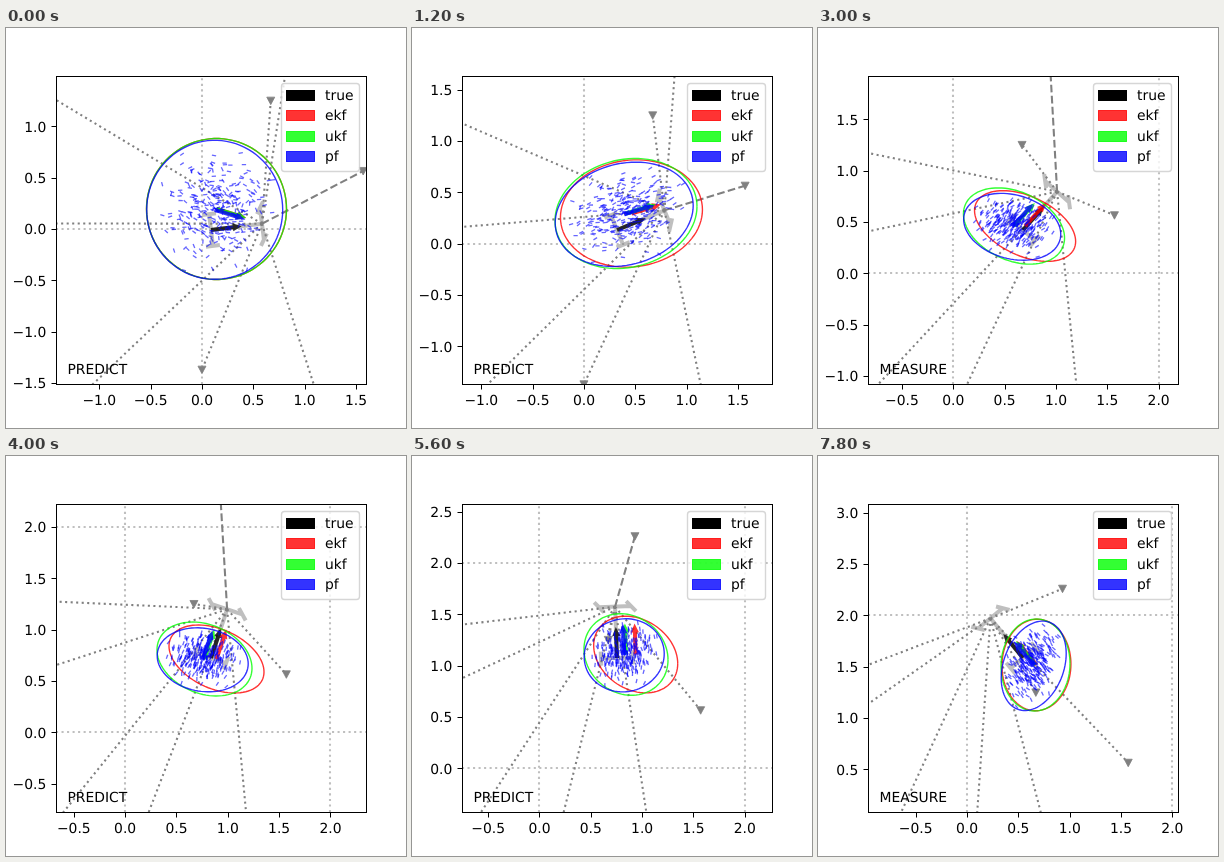
Animation, 400 px wide and 400 px high, one loop 8 s. Source, as an HTML page with a canvas:

```html
<!DOCTYPE html>
<html lang="en">
<head>
<meta charset="utf-8">
<title>Localization filters</title>
<style>
html, body { margin: 0; width: 100%; height: 100%; overflow: hidden; background: #fff; }
canvas { display: block; width: 400px; height: 400px; }
</style>
</head>
<body>
<canvas id="stage" width="400" height="400"></canvas>
<script>
const c = document.getElementById('stage').getContext('2d');
const SCALE = 308 / 3, CX = 205, CY = 202, WHEELBASE = 0.5;
const FRAME_MS = 200, FRAMES = 40;
const RAD = Math.PI / 180;
const COLORS = { true: '#000', ekf: '#f00', ukf: '#0f0', pf: '#00f' };
const dotted = [2.083, 3.4375], dashed = [7.71, 3.33];
const landmarks = [[0.67, 1.25], [1.57, 0.565], [0, -1.37], [0.93, 2.26],
  [1.31, -2.2], [-1.62, -2.04], [-2.51, 0.055], [-1.51, 1.31]];

// frame, true x, true y, estimate's offset in pixels
const path = [[0, 0.088, -0.01, 5.5, -21], [6, 0.322, 0.133, 9, -16.5], [11, 0.545, 0.214, -11, -8],
  [20, 0.847, 0.68, -6.5, 1], [28, 0.76, 1.032, 9, -3.5], [32, 0.74, 1.198, 4.5, -7.5], [39, 0.545, 1.585, 12.5, 7]];
// frame, half width, half height, correlation
const shape = [[0, 70, 70.5, 0], [6, 71, 55, 0.13], [11, 53, 39, -0.37], [20, 47.5, 37, -0.25], [39, 34.5, 46, 0.03]];

// How each filter departs from the common estimate, over the loop's progress t
const bias = {
  ekf: t => { const w = Math.sin(Math.PI * t); return [12 * w, 0, 0, -3 * w, -0.13 * w]; },
  ukf: () => [0, 0, 0, 0, 0],
  pf: t => [-1.8, 0.8, -2, -1 - 4 * Math.sin(Math.PI * t), 0.25 * t]
};
const headingAt = step => (4 + 6.47 * step + 3 * Math.cos(Math.PI * step / 5)) * RAD;

let seed = 7;
function random() {
  seed = (seed * 16807) % 2147483647;
  return seed / 2147483647;
}
// Bell-shaped, variance 1, bounded by 3
const bell = () => 2 * (random() + random() + random()) - 3;
const particles = Array.from({ length: 300 }, () => [bell(), bell(), bell()]);

function sample(rows, frame) {
  let i = 0;
  while (i < rows.length - 2 && frame > rows[i + 1][0]) i++;
  const [from, to] = [rows[i], rows[i + 1]];
  const u = (frame - from[0]) / (to[0] - from[0]);
  return from.map((v, j) => v + (to[j] - v) * u).slice(1);
}

function trace(points) {
  c.beginPath();
  points.forEach(([x, y]) => c.lineTo(x, y));
}

function line(points, color, width, dash = []) {
  trace(points);
  c.strokeStyle = color;
  c.lineWidth = width;
  c.setLineDash(dash);
  c.stroke();
  c.setLineDash([]);
}

// Point of a tilted ellipse in screen pixels
const ellipsePoint = ([dx, dy, a, b, r], u, v) =>
  [CX + dx + a * u, CY + dy - b * (r * u + Math.sqrt(1 - r * r) * v)];

function drawArrow(x, y, angle, color) {
  c.save();
  c.translate(x, y);
  c.rotate(-angle);
  trace([[0, -2], [22, -2], [22, -4], [31, 0], [22, 4], [22, 2], [0, 2]]);
  c.globalAlpha = 0.8;
  c.fillStyle = color;
  c.fill();
  c.restore();
}

function drawRobot(heading, steer) {
  const length = WHEELBASE * SCALE, half = 16, wheel = 7;
  c.save();
  c.translate(CX, CY);
  c.rotate(-heading);
  c.beginPath();
  const segment = (x1, y1, x2, y2) => { c.moveTo(x1, y1); c.lineTo(x2, y2); };
  segment(0, 0, length, 0);
  for (const [x, turn] of [[0, 0], [length, steer]]) {
    segment(x, -half, x, half);
    const wx = wheel * Math.cos(turn), wy = -wheel * Math.sin(turn);
    for (const y of [-half, half]) segment(x - wx, y - wy, x + wx, y + wy);
  }
  c.strokeStyle = 'rgba(128,128,128,.5)';
  c.lineWidth = 4;
  c.stroke();
  c.restore();
}

function drawLandmarks(front, heading, sx, sy) {
  for (const [lx, ly] of landmarks) {
    const x = sx(lx), y = sy(ly);
    const off = Math.atan2(front[1] - y, x - front[0]) - heading;
    const inView = Math.cos(off) > Math.cos(61 * RAD);
    line([front, [x, y]], '#808080', 2.08, inView ? dashed : dotted);
    trace([[x - 4, y - 3.5], [x + 4, y - 3.5], [x, y + 4]]);
    c.closePath();
    c.fillStyle = '#808080';
    c.fill();
    c.lineWidth = 0.8;
    c.stroke();
  }
}

function drawFilter(name, frame, heading) {
  const t = frame / FRAMES;
  const [, , dx, dy] = sample(path, frame);
  const delta = bias[name](t);
  const est = [dx, dy, ...sample(shape, frame)].map((v, i) => v + delta[i]);
  const outline = Array.from({ length: 91 }, (_, i) =>
    ellipsePoint(est, Math.cos(i * 4 * RAD), Math.sin(i * 4 * RAD)));
  c.globalAlpha = 0.8;
  line(outline, COLORS[name], 1.39);
  if (name === 'pf') {
    const noise = Math.max(0.2, 0.6 - 0.04 * frame);
    c.globalAlpha = 0.6;
    for (const [u, v, w] of particles) {
      const [x, y] = ellipsePoint(est, u / 3, v / 3);
      const a = heading + w * noise;
      line([[x, y], [x + 4.3 * Math.cos(a), y - 4.3 * Math.sin(a)]], COLORS.pf, 1.3);
    }
  }
  c.globalAlpha = 1;
  drawArrow(CX + est[0], CY + est[1], heading, COLORS[name]);
}

function drawAxes(x0, y0, sx, sy) {
  c.fillStyle = '#000';
  const label = v => v.toFixed(1).replace('-', '\u2212');
  for (let v = -3; v <= 4; v += 0.5) {
    const x = sx(v), y = sy(v);
    if (x >= 50 && x <= 360) {
      const px = Math.round(x) + 0.5;
      line([[px, 357], [px, 361.5]], '#000', 1);
      c.textAlign = 'center';
      c.fillText(label(v), x, 377);
    }
    if (y >= 48 && y <= 356) {
      const py = Math.round(y) + 0.5;
      line([[45.5, py], [50, py]], '#000', 1);
      c.textAlign = 'right';
      c.fillText(label(v), 40.3, y + 5.3);
    }
  }
  c.lineWidth = 1;
  c.strokeRect(50.5, 48.5, 310, 308);
}

function drawLegend() {
  c.beginPath();
  c.roundRect(275.5, 55.5, 78, 88, 3);
  c.fillStyle = 'rgba(255,255,255,.8)';
  c.fill();
  c.strokeStyle = 'rgba(204,204,204,.8)';
  c.lineWidth = 1.39;
  c.stroke();
  c.textAlign = 'left';
  c.lineWidth = 1;
  Object.entries(COLORS).forEach(([name, color], i) => {
    const y = 62 + i * 20.4, top = Math.round(y) + 0.5;
    c.globalAlpha = name === 'true' ? 1 : 0.8;
    c.fillStyle = c.strokeStyle = color;
    c.fillRect(280.5, top, 28, 10);
    c.strokeRect(280.5, top, 28, 10);
    c.globalAlpha = 1;
    c.fillStyle = '#000';
    c.fillText(name, 319, y + 10);
  });
}

function draw(frame) {
  // The robot moves on even frames and measures on odd ones
  const measuring = frame % 2, step = frame >> 1;
  const [x0, y0] = sample(path, Math.min(step * 2 + (step > 4), 39));
  const heading = headingAt(step);
  const estHeading = heading - 24 * RAD * Math.exp(-frame / 4);
  const steer = (58 - 0.55 * frame) * RAD;
  const sx = x => CX + (x - x0) * SCALE, sy = y => CY - (y - y0) * SCALE;
  const front = [CX + WHEELBASE * SCALE * Math.cos(heading), CY - WHEELBASE * SCALE * Math.sin(heading)];

  c.font = '13.89px "DejaVu Sans", sans-serif';
  c.textRendering = 'geometricPrecision';
  c.fillStyle = '#fff';
  c.fillRect(0, 0, 400, 400);

  c.save();
  c.beginPath();
  c.rect(50, 48, 310, 308);
  c.clip();
  for (const v of [0, 2]) {
    const x = Math.round(sx(v)), y = Math.round(sy(v));
    line([[x, 356], [x, 48]], '#bfbfbf', 2.08, dotted);
    line([[50, y], [360, y]], '#bfbfbf', 2.08, dotted);
  }
  drawLandmarks(front, heading, sx, sy);
  drawRobot(heading, steer);
  drawArrow(CX, CY, heading, COLORS.true);
  for (const name in bias) drawFilter(name, frame, estHeading);
  c.restore();

  drawAxes(x0, y0, sx, sy);
  c.textAlign = 'left';
  c.fillText(measuring ? 'MEASURE' : 'PREDICT', 61.5, 346);
  drawLegend();
}

const start = performance.now();
function tick() {
  draw(Math.floor((performance.now() - start) / FRAME_MS) % FRAMES);
  requestAnimationFrame(tick);
}
tick();
</script>
</body>
</html>
```
